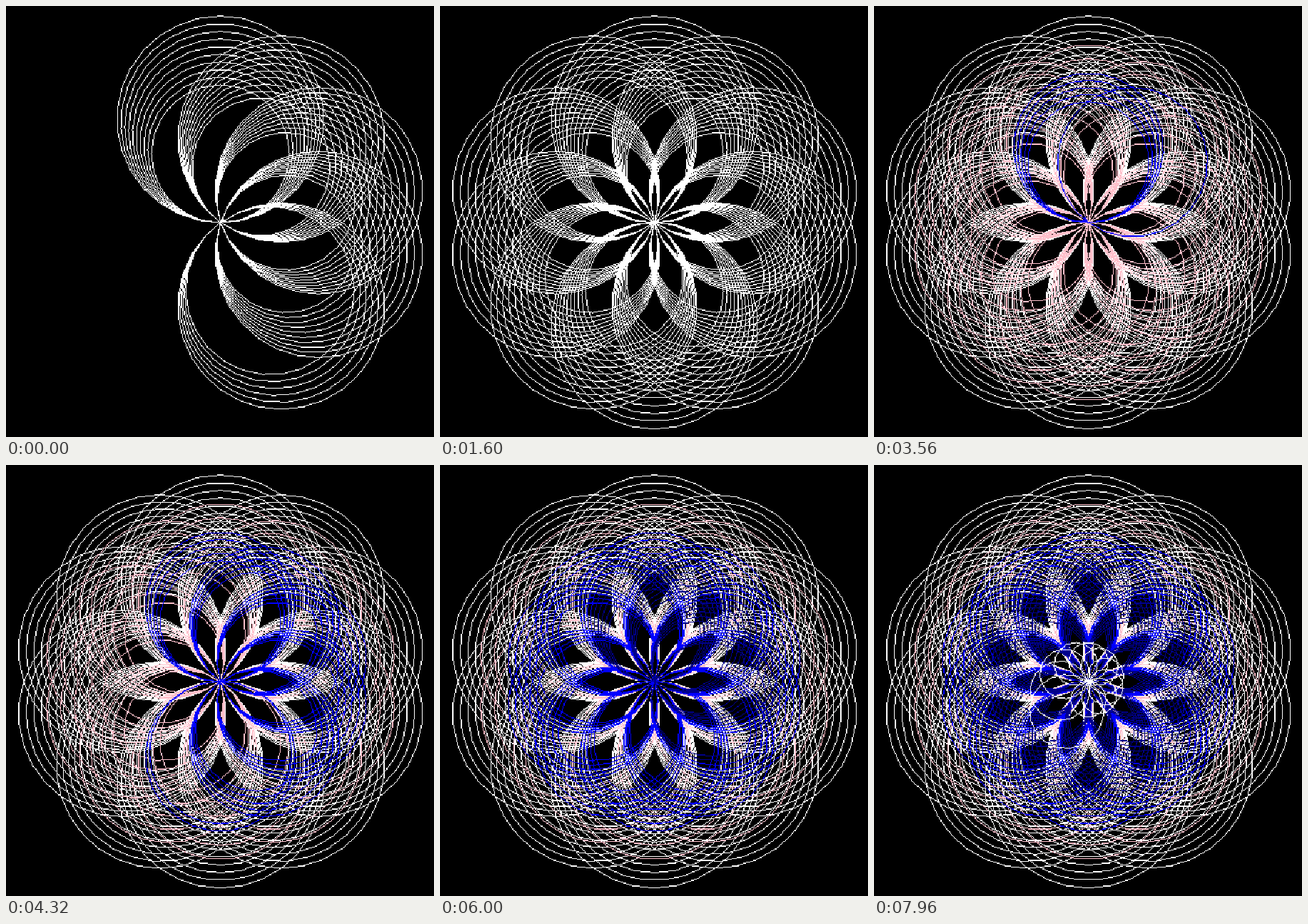
An HTML page with a canvas for the animation above (8000 ms loop, 600 px wide and 605 px high).

```html
<!DOCTYPE html>
<html lang="en">
<head>
<meta charset="utf-8">
<title>Circle flower</title>
<style>
  html, body { margin: 0; width: 100%; height: 100%; overflow: hidden; background: #000; }
  canvas { display: block; width: 600px; height: 605px; image-rendering: pixelated; }
</style>
</head>
<body>
<canvas id="stage" width="450" height="454"></canvas>
<script>
// Drawn on a coarser grid and enlarged, which gives the stepped line weight.
const LOOP = 8000, W = 450, H = 454, SCALE = W / 600;
const CX = 300 * SCALE, CY = 303.5 * SCALE;
const ctx = document.getElementById('stage').getContext('2d');
const image = ctx.createImageData(W, H);
const pixels = new Uint32Array(image.data.buffer);

const WHITE = [255, 255, 255], PINK = [255, 192, 203], BLUE = [0, 0, 255], NAVY = [0, 0, 139];
const pack = ([r, g, b]) => (255 << 24 | b << 16 | g << 8 | r) >>> 0;
const circles = [];

function addCircle(color, size, heading) {
  circles.push({ color, radius: size * SCALE, heading });
}

// Ten bundles of shrinking circles, turning clockwise around the hub.
function addFlower(color, size, count, step) {
  for (let petal = 0; petal < 10; petal++)
    for (let i = 0; i < count; i++)
      addCircle(color, size - i * step, -petal * Math.PI / 5);
}
addFlower(WHITE, 145, 10, 5.36);
addFlower(PINK, 125, 5, 10);
addFlower(BLUE, 105, 5, 5);
addFlower(NAVY, 85, 5, 5);
for (let i = 0; i < 10; i++)
  addCircle(WHITE, 25 + 27 * (i / 9) ** 4, (i + 5) * Math.PI / 5);

// Pace of the pen: [time in ms, circles finished]
const pace = [[0, 46], [800, 71.2], [1680, 100.2], [2440, 125.2], [3360, 150.2],
  [3560, 156.2], [5080, 198.5], [5160, 200], [7620, 250], [7950, 260], [LOOP, 260]];

function finishedAt(time) {
  const k = pace.findIndex(([t]) => t > time);
  const [t0, n0] = pace[k - 1], [t1, n1] = pace[k];
  return Math.floor(n0 + (n1 - n0) * (time - t0) / (t1 - t0));
}

function line(x0, y0, x1, y1, color) {
  const steps = Math.max(1, Math.ceil(Math.max(Math.abs(x1 - x0), Math.abs(y1 - y0))));
  for (let i = 0; i <= steps; i++) {
    const x = Math.round(x0 + (x1 - x0) * i / steps);
    const y = Math.round(y0 + (y1 - y0) * i / steps);
    pixels[y * W + x] = color;
  }
}

// Each circle is a polygon that starts and ends at the hub.
function drawCircle({ color, radius, heading }) {
  const sides = 12 + Math.floor(radius / 6);
  const point = k => {
    const a = heading + 2 * Math.PI * k / sides;
    return [CX + radius * (Math.sin(a) - Math.sin(heading)),
            CY - radius * (Math.cos(heading) - Math.cos(a))];
  };
  for (let k = 0; k < sides; k++)
    line(...point(k), ...point(k + 1), pack(color));
}

// The arrow-shaped pen rests at the hub, its tail behind it.
function drawPen({ color, heading }) {
  ctx.save();
  ctx.translate(CX, CY);
  ctx.rotate(-heading);
  ctx.fillStyle = `rgb(${color})`;
  ctx.beginPath();
  ctx.moveTo(0, 0);
  ctx.lineTo(-7, -4);
  ctx.lineTo(-5, 0);
  ctx.lineTo(-7, 4);
  ctx.fill();
  ctx.restore();
}

let drawn = Infinity;

function render(time) {
  const finished = finishedAt(time);
  if (finished < drawn) {
    pixels.fill(pack([0, 0, 0]));
    drawn = 0;
  }
  while (drawn < finished) drawCircle(circles[drawn++]);
  ctx.putImageData(image, 0, 0);
  drawPen(circles[finished - 1]);
}

const start = performance.now();
function tick() {
  render((performance.now() - start) % LOOP);
  requestAnimationFrame(tick);
}
tick();
</script>
</body>
</html>
```
